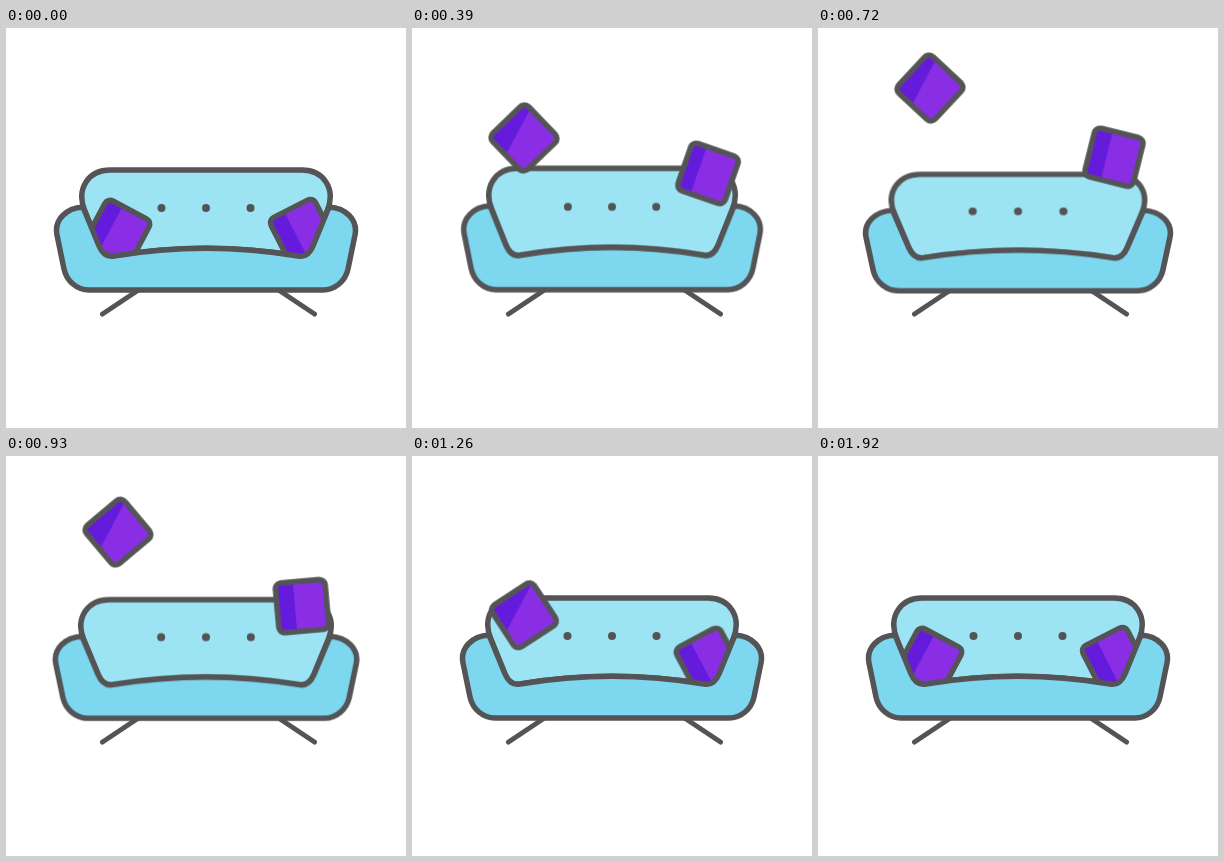
Recreate the animation shown at these times as an HTML page without scripts. Size 400x400 px, loop 3950 ms.

```html
<!DOCTYPE html>
<html lang="en">
<head>
<meta charset="utf-8">
<title>Sofa with bouncing cushions</title>
<style>
  @property --y { syntax: "<length>"; inherits: true; initial-value: 0px; }
  @property --turn { syntax: "<angle>"; inherits: true; initial-value: 0deg; }
  @property --slip { syntax: "<length>"; inherits: true; initial-value: 0px; }

  :root {
    --loop: 3950ms;
    --out: cubic-bezier(.33, .5, .67, 1);
    --launch: cubic-bezier(.2, .4, .6, .86);
    --fall: cubic-bezier(.333, 0, .667, .333);
    --drop: cubic-bezier(.333, .194, .667, .527);
  }
  html, body { margin: 0; width: 100%; height: 100%; overflow: hidden; background: #fff; }
  svg { display: block; width: 100%; height: 100%; }

  .line { stroke: #545456; stroke-width: 5.5; stroke-linecap: round; stroke-linejoin: round; }
  .legs { fill: none; stroke-width: 5; }
  .back { fill: #9ce4f3; }
  .seat { fill: #7dd7ef; }
  .dots { fill: #545456; }
  .cushion { fill: #8a2ee6; }
  .shade { fill: #651bdc; }

  .squash {
    transform-origin: 200px 290px;
    animation: squash var(--loop) ease-in-out infinite;
  }
  .pillow { transform: translate(var(--x), var(--y)) rotate(var(--turn)); }
  .left { --x: 112px; animation: left var(--loop) linear infinite; }
  .right { --x: 296px; animation: right var(--loop) linear infinite; }

  /* the left shade keeps its slant while the cushion turns, the right one slides */
  .left .shade { transform: rotate(calc(28deg - var(--turn))); }
  .right .shade { transform: translateX(var(--slip)); }

  @keyframes squash {
    0%, .76% { transform: none; }
    5.32% { transform: scale(1.041, .938); animation-timing-function: ease-in; }
    6.84% { transform: scale(1.03, .955); animation-timing-function: ease-out; }
    11.6% { transform: scale(.984, 1.023); }
    12.91% { transform: scale(.987, 1.018); }
    18.7% { transform: scale(1.02, .97); }
    23.54% { transform: scale(1.008, .989); }
    26.5% { transform: none; }
    28.8% { transform: scale(1.012, .982); }
    31.5%, 34.7% { transform: none; }
    36.5% { transform: scale(1.012, .982); }
    39.5%, 100% { transform: none; }
  }
  @keyframes left {
    0%, .76% { --y: 204px; --turn: 28deg; }
    5.32% { --y: 207px; --turn: 42deg; }
    6.84% { --y: 193px; --turn: 57deg; animation-timing-function: var(--launch); }
    12.91% { --y: 90px; --turn: 43.5deg; animation-timing-function: var(--out); }
    18.23% { --y: 60px; --turn: 43deg; animation-timing-function: var(--fall); }
    23.54% { --y: 76px; --turn: 50deg; animation-timing-function: var(--drop); }
    31.9% { --y: 159px; --turn: 57deg; }
    35% { --y: 203px; --turn: 36deg; }
    36.5% { --y: 207px; --turn: 27deg; }
    39.5%, 100% { --y: 204px; --turn: 28deg; }
  }
  @keyframes right {
    0%, .76% { --y: 203px; --turn: -27deg; --slip: 0px; }
    5.32% { --y: 206px; --turn: -32deg; }
    6.84% { --y: 193px; --turn: -38deg; --slip: -6px; animation-timing-function: var(--launch); }
    12.91% { --y: 134px; --turn: 33deg; --slip: -2px; animation-timing-function: var(--out); }
    16.5% { --y: 115px; --turn: 27deg; animation-timing-function: var(--fall); }
    23.54% { --y: 150px; --turn: -5deg; --slip: 0px; animation-timing-function: var(--drop); }
    27.8% { --y: 203px; --turn: -24deg; }
    29.2% { --y: 206px; --turn: -30deg; }
    31.9% { --y: 204px; --turn: -28deg; }
    34%, 100% { --y: 203px; --turn: -27deg; --slip: 0px; }
  }
</style>
</head>
<body>
<svg viewBox="0 0 400 400">
  <defs>
    <rect id="square" x="-25" y="-25" width="50" height="50" rx="6"/>
    <clipPath id="inside"><use href="#square"/></clipPath>
  </defs>

  <path class="line legs" d="M134 261 L96.500 286 M271 261 L308.500 286"/>

  <g class="squash">
    <path class="line back" d="M93 218 L78.500 182 C70 160 83 142 104 142 H296 C317 142 330 160 321.500 182
      L307 218 C304 225 299 229.500 292 228 Q200 212.500 108 228 C101 229.500 96 225 93 218 Z"/>
    <g class="dots">
      <circle cx="155.500" cy="180" r="4"/>
      <circle cx="200" cy="180" r="4"/>
      <circle cx="244.500" cy="180" r="4"/>
    </g>
  </g>

  <g class="pillow left">
    <use class="cushion" href="#square"/>
    <g clip-path="url(#inside)"><rect class="shade" x="-48" y="-48" width="40" height="96"/></g>
    <use class="line" fill="none" href="#square"/>
  </g>
  <g class="pillow right">
    <use class="cushion" href="#square"/>
    <g clip-path="url(#inside)"><rect class="shade" x="-48" y="-48" width="41" height="96"/></g>
    <use class="line" fill="none" href="#square"/>
  </g>

  <g class="squash">
    <path class="line seat" d="M77 179 C60 180 48 192 51 207 L58 241 C60.500 253 71 262 83 262 H317
      C329 262 339.500 253 342 241 L349 207 C352 192 340 180 323 179 L307 218
      C304 225 299 229.500 292 228 Q200 212.500 108 228 C101 229.500 96 225 93 218 Z"/>
  </g>
</svg>
</body>
</html>
```
